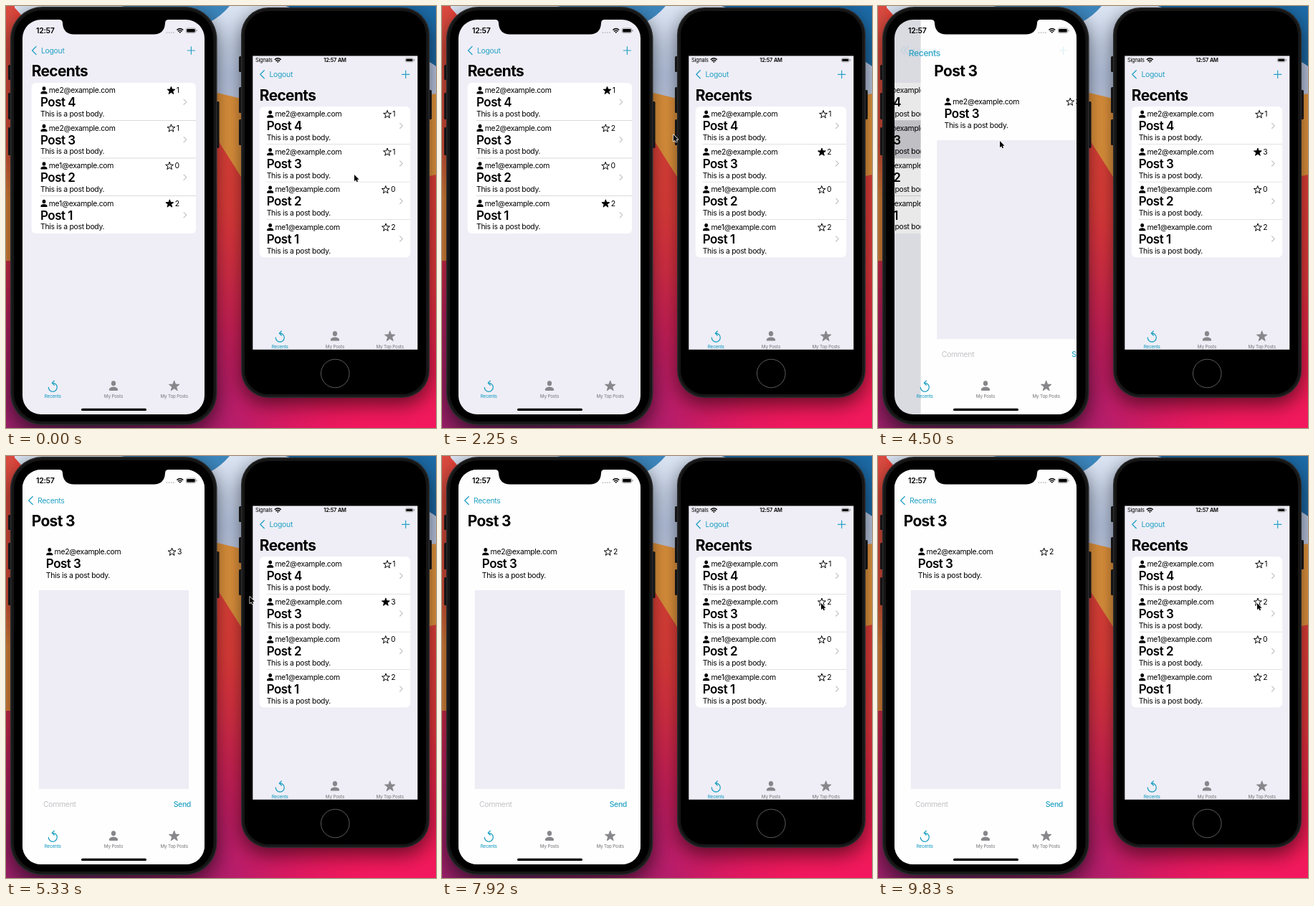
An HTML page with a canvas for the animation above (9910 ms loop, 600x588 px).

```html
<!DOCTYPE html>
<html lang="en">
<head>
<meta charset="utf-8">
<title>Two phones in sync</title>
<style>
html, body { margin: 0; width: 100%; height: 100%; overflow: hidden; background: #000; }
canvas { display: block; }
</style>
</head>
<body>
<canvas id="stage" width="600" height="588"></canvas>
<script>
const ctx = document.getElementById('stage').getContext('2d');
const LOOP = 9910;
const TINT = '#25a2c5', PAGE = '#efeef6', GREY = '#87878b', BODY = 10.43, TITLE = 20.9;
const POSTS = [['me2@example.com', 4], ['me2@example.com', 3], ['me1@example.com', 2], ['me1@example.com', 1]];
const LIKE_RIGHT = 1000, LIKE_LEFT = 3150, PRESS = 4130, PUSH = 4230, UNLIKE = 6700;
// Pointer stops: time, x, y
const POINTER = [[0, 486, 235], [200, 486, 235], [850, 531, 204], [1500, 531, 204], [2700, 227, 168],
  [3500, 227, 168], [4000, 170, 188], [4800, 170, 188], [5900, 529, 205], [LOOP, 529, 205]];

const clamp = v => Math.min(1, Math.max(0, v));
const mix = (a, b, p) => a + (b - a) * p;

function shape(path, color, x = 0, y = 0, scale = 1) {
  ctx.save();
  ctx.translate(x, y);
  ctx.scale(scale, scale);
  ctx.fillStyle = color;
  ctx.fill(new Path2D(path));
  ctx.restore();
}

function line(path, color, width, x = 0, y = 0) {
  ctx.save();
  ctx.translate(x, y);
  ctx.strokeStyle = color;
  ctx.lineWidth = width;
  ctx.lineCap = ctx.lineJoin = 'round';
  ctx.stroke(new Path2D(path));
  ctx.restore();
}

function box(x, y, w, h, r, color) {
  ctx.fillStyle = color;
  ctx.beginPath();
  ctx.roundRect(x, y, w, h, r);
  ctx.fill();
}

// y is the middle of the capital letters
function text(str, x, y, size = BODY, color = '#000', weight = 400, align = 'left') {
  ctx.font = `${weight} ${size}px Inter, sans-serif`;
  ctx.letterSpacing = `${-0.03 * size}px`;
  ctx.textAlign = align;
  ctx.fillStyle = color;
  ctx.fillText(str, x, y + size * 0.36);
  return ctx.measureText(str).width;
}

function faded(alpha, draw) {
  ctx.save();
  ctx.globalAlpha *= clamp(alpha);
  draw();
  ctx.restore();
}

function star(x, y, r, filled, color = '#000') {
  ctx.beginPath();
  for (let i = 0; i < 10; i++) {
    const a = i * Math.PI / 5 - Math.PI / 2, d = i % 2 ? r * 0.41 : r;
    ctx.lineTo(x + d * Math.cos(a), y + d * Math.sin(a));
  }
  ctx.closePath();
  ctx.lineJoin = 'round';
  ctx.lineWidth = 1;
  ctx.strokeStyle = ctx.fillStyle = color;
  if (filled) ctx.fill();
  ctx.stroke();
}

const person = (x, y, scale = 1, color = '#000') => shape(
  'M-2.4-2.6a2.4 2.7 0 1 1 4.8 0a2.4 2.7 0 1 1-4.8 0M-4.7 4.1C-4.4.1 4.4.1 4.7 4.1Q4.6 5 3.8 5H-3.8Q-4.6 5-4.7 4.1',
  color, x, y, scale);
const backArrow = (x, y) => line('M5.5-5.5L0 0L5.5 5.5', TINT, 1.3, x, y);
const plus = (x, y) => line('M-5.2 0H5.2M0-5.2V5.2', TINT, 1.2, x, y);

function wifi(x, y) {
  line('M-4-1.4Q0-4.8 4-1.4M-2.4.6Q0-1.4 2.4.6', '#000', 1.4, x, y);
  shape('M-1.4 1.8Q0 .8 1.4 1.8L0 3.4Z', '#000', x, y);
}

function battery(x, y, w, h) {
  ctx.strokeStyle = '#888';
  ctx.lineWidth = 0.7;
  ctx.beginPath();
  ctx.roundRect(x, y - h / 2, w, h, 2);
  ctx.stroke();
  box(x + 1, y - h / 2 + 1, w - 2, h - 2, 1, '#000');
  box(x + w + 0.8, y - 1.2, 1, 2.4, 0.5, '#888');
}

function row(x, right, y, [email, id], likes, liked) {
  person(x + 5, y);
  text(email, x + 11.8, y);
  text(`Post ${id}`, x, y + 16.5, 17, '#000', 600);
  text('This is a post body.', x, y + 32.6);
  const w = text(String(likes), right, y, BODY, '#000', 400, 'right');
  star(right - w - 7.3, y + 0.5, 5.7, liked);
}

function list(x, y, width, inset, likes, liked, pressed) {
  const right = x + width, step = 52.5;
  box(x, y, width, 4 * step, 6, '#fff');
  POSTS.forEach((post, i) => {
    const top = y + i * step;
    if (i === pressed) box(x, top, width, step, 0, '#d1d1d6');
    if (i) box(x + inset, top - 0.4, width - inset, 0.8, 0, '#d9d9dd');
    row(x + inset, right - inset - 11, top + 10.5, post, likes[i], liked[i]);
    line('M-1.8-3.6L1.8 0L-1.8 3.6', '#c2c2c6', 1.2, right - inset - 2.8, top + 26.7);
  });
}

function tabs(centers, y) {
  const [a, b, c] = centers;
  line('M0-5A6 6 0 1 1-6 1M2-8L-1-5L2-2', TINT, 1.3, a, y + 1);
  person(b, y, 1.32, GREY);
  star(c, y + 0.4, 7.6, true, GREY);
  ['Recents', 'My Posts', 'My Top Posts'].forEach((label, i) =>
    text(label, centers[i], y + 14.3, 6.3, i ? GREY : TINT, 500, 'center'));
}

function verticalFade(y0, y1, ...stops) {
  const fade = ctx.createLinearGradient(0, y0, 0, y1);
  stops.forEach(([at, color]) => fade.addColorStop(at, color));
  return fade;
}

function wallpaper() {
  box(0, 0, 600, 588, 0, verticalFade(190, 588, [0, '#e9443a'], [0.45, '#ea3a3d'], [0.75, '#f01f4e'], [1, '#f3175f']));
  const glow = ctx.createRadialGradient(120, 620, 20, 120, 620, 390);
  glow.addColorStop(0, '#742568');
  glow.addColorStop(0.5, 'rgba(165,30,110,.75)');
  glow.addColorStop(1, 'rgba(220,20,90,0)');
  box(0, 0, 600, 588, 0, glow);
  shape('M150 0H600V235Q450 270 328 238L295 186Q200 200 150 0Z', '#eb9a3f');
  shape('M10 0H600V122Q460 150 328 129L295 121Q140 150 10 0Z',
    verticalFade(0, 160, [0, '#dce5f3'], [0.6, '#bccbe7'], [1, '#c9d0e8']));
  box(0, 0, 12, 355, 0, verticalFade(0, 355, [0, '#dc4a40'], [0.55, '#e0503a'], [0.75, '#e58a3c'], [1, '#e58a3c']));
  shape('M160 0H312Q300 14 285 22Z', '#3c86bd');
  shape('M390 0H600V84Q570 60 390 0Z', '#1c6ba8');
}

function phoneBody(x, y, w, h, r, buttons) {
  for (const [bx, by, bh] of buttons) box(bx, by, 4, bh, 1.5, '#1b1b1d');
  ctx.save();
  ctx.shadowColor = 'rgba(0,0,0,.6)';
  ctx.shadowBlur = 28;
  ctx.shadowOffsetY = 9;
  box(x, y, w, h, r, '#2a2a2c');
  ctx.restore();
  box(x + 1.5, y + 1.5, w - 3, h - 3, r - 1.5, '#161617');
  box(x + 5, y + 5, w - 10, h - 10, r - 5, '#000');
}

function leftScreen(t, likes, rest) {
  const done = 1 - rest, shift = 254 * rest;
  box(23, 19, 254, 550, 0, PAGE);
  if (rest > 0) {
    list(35.7 - 76 * done, 107, 229.3, 12.3, likes, [true, t >= LIKE_LEFT, false, true], t >= PRESS ? 1 : -1);
  }
  if (done > 0) {
    box(23, 19, 254, 550, 0, `rgba(0,0,0,${0.1 * done})`);
    ctx.save();
    ctx.translate(shift, 0);
    box(23, 19, 254, 550, 0, '#fefefe');
    row(55.8, 245, 133.3, POSTS[1], likes[1], false);
    box(45.7, 187, 209.3, 277, 0, '#eeedf5');
    text('Comment', 52, 485.5, BODY, '#c2c2c6');
    text('Send', 258, 485.5, BODY, TINT, 500, 'right');
    ctx.restore();
    text('Post 3', 35.7 + shift * 1.16, 90.5, TITLE, '#000', 700);
  }
  faded(rest, () => {
    backArrow(36.5, 62);
    text('Logout', 49, 62, BODY, TINT);
    plus(258.4, 62);
  });
  // The large title shrinks into the back label
  const label = [mix(44, 35.7, rest), mix(62, 90.5, rest), mix(BODY, TITLE, rest)];
  faded(1 - done * 2.5, () => text('Recents', ...label, '#000', 700));
  faded(done, () => text('Recents', ...label, TINT, rest > 0.01 ? 600 : 400));
  faded(1 - rest * 6, () => backArrow(31.7, 62));

  text('12:57', 42, 34, 10.6, '#000', 600);
  for (let i = 0; i < 4; i++) box(223.5 + i * 3.2, 36.2, 1.8, 1.8, 0.9, '#b5b5ba');
  wifi(242.8, 34.5);
  battery(251.2, 34.2, 13.5, 6.6);
  tabs([65.3, 150, 234.7], 529.3);
  box(105, 560.8, 91, 3.2, 1.6, '#000');
}

function leftPhone(t, likes, rest) {
  phoneBody(6, 1, 288.5, 583, 45, [[3, 82, 21], [3, 121, 37], [3, 169, 39], [293.5, 133, 65]]);
  ctx.save();
  ctx.beginPath();
  ctx.roundRect(23, 19, 254, 550, 26);
  ctx.clip();
  leftScreen(t, likes, rest);
  shape('M74 19Q79 19 79 24Q80 39.5 95 39.5H206Q221 39.5 222 24Q222 19 227 19Z', '#000');
  ctx.restore();
}

function rightPhone(t, likes) {
  phoneBody(328, 2, 263, 544, 38, [[325, 70, 22], [325, 113, 36], [325, 158, 36], [590, 117, 41]]);
  box(344.3, 69.4, 230, 409.3, 0, PAGE);
  text('Signals', 348, 75.6, 7.4);
  wifi(379.3, 75.8);
  text('12:57 AM', 459, 75.6, 7.5, '#000', 600, 'center');
  battery(557.3, 75.4, 11, 5.2);
  backArrow(354.8, 95.3);
  text('Logout', 367.5, 95.3, BODY, TINT);
  plus(557.7, 95.3);
  text('Recents', 353.8, 124, TITLE, '#000', 700);
  list(353.8, 140.2, 210.4, 9.9, likes, [false, t >= LIKE_RIGHT && t < UNLIKE, false, false], -1);
  tabs([382.3, 459, 535.7], 460);
  ctx.beginPath();
  ctx.arc(459.3, 512, 19.8, 0, 2 * Math.PI);
  ctx.strokeStyle = '#5c5c5e';
  ctx.lineWidth = 1;
  ctx.stroke();
}

function pointer(t) {
  const next = Math.max(1, POINTER.findIndex(stop => stop[0] > t));
  const [t0, x0, y0] = POINTER[next - 1], [t1, x1, y1] = POINTER[next];
  const p = (t - t0) / (t1 - t0), eased = p * p * (3 - 2 * p);
  const x = mix(x0, x1, eased), y = mix(y0, y1, eased);
  const arrow = 'M0 0V9.2L2.1 7.3L3.5 10.3L5.1 9.6L3.8 6.7H6.6Z';
  line(arrow, '#fff', 1.4, x, y);
  shape(arrow, '#000', x, y);
}

function draw(now) {
  const t = now % LOOP;
  const third = 1 + (t >= LIKE_RIGHT) + (t >= LIKE_LEFT) - (t >= UNLIKE);
  const likes = [1, third, 0, 2];
  const rest = (1 - clamp((t - PUSH) / 570)) ** 3;
  wallpaper();
  leftPhone(t, likes, rest);
  rightPhone(t, likes);
  pointer(t);
}

const start = performance.now();
function tick() {
  draw(performance.now() - start);
  requestAnimationFrame(tick);
}
tick();
</script>
</body>
</html>
```
